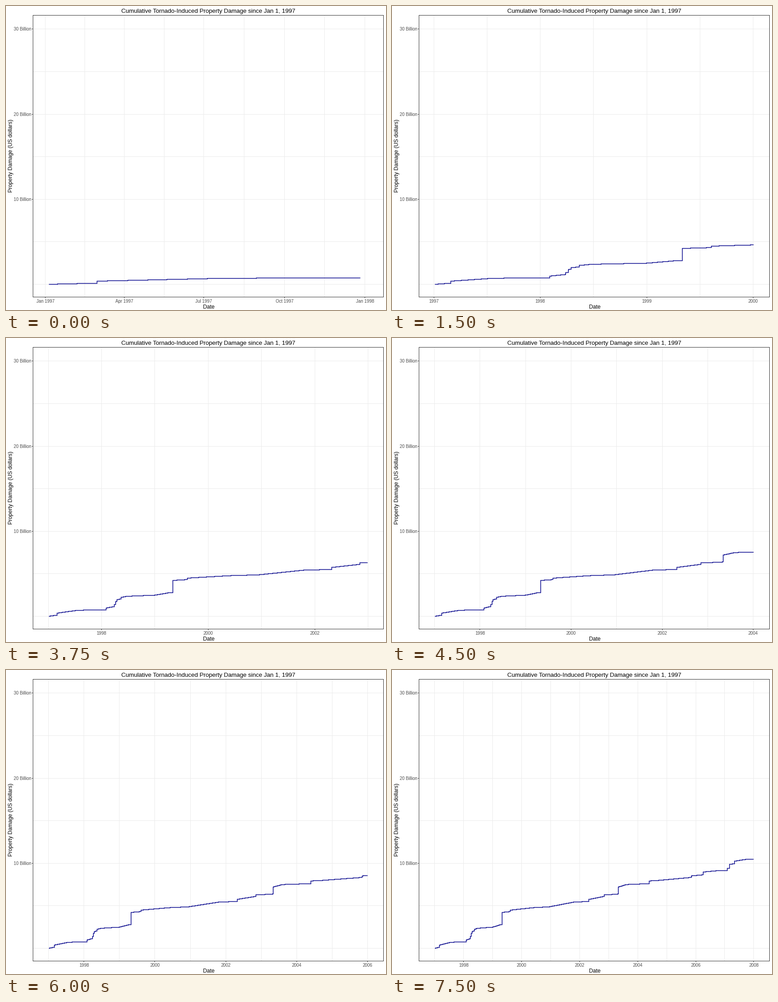
A matplotlib script for the animation above (8 s loop, 837x669 px).

```python
import numpy as np
import matplotlib.pyplot as plt
from matplotlib.animation import FuncAnimation
from matplotlib.patches import Rectangle

W, H, DPI = 837, 669, 72
LEFT, RIGHT, TOP, BOTTOM = 59.5, 831.5, 20.5, 640.5
PAD = (RIGHT - LEFT) / 22         # 5% of the data width on each side
DATA_X, DATA_W = LEFT + PAD, RIGHT - LEFT - 2 * PAD
ZERO_Y, PX_PER_BILLION = 612.4, 18.72
FIRST_DAY = 4                     # days since Jan 1, 1997
GRID, EDGE, TICK_TEXT, NAVY = "#ebebeb", "#333333", "#4d4d4d", "#00008b"

# Slow growth between outbreaks: (day, billions)
GROWTH = [(4, 0), (205, .47), (390, .50), (540, 1.0), (731, 1.13),
          (828, 1.42), (1240, 1.83), (1440, 1.93), (1750, 2.48),
          (1942, 2.57), (2118, 2.9), (2302, 2.99), (2410, 3.32),
          (2785, 3.46), (3576, 4.13), (3711, 4.13), (3938, 4.47)]
# Single outbreaks: (day, billions added)
OUTBREAKS = [(59, .24), (397, .20), (452, .23), (462, .32), (470, .19),
             (499, .17), (852, 1.42), (952, .17), (1943, .23), (2136, .20),
             (2315, .80), (2702, .32), (3231, .18), (3380, .33),
             (3684, .24), (3711, .48), (3775, .29)]
LAST_STORM = {0: 360, 3: 1445}    # seasons that ended early

plt.rcParams["font.family"] = "Liberation Sans"
fig = plt.figure(figsize=(W / DPI, H / DPI), dpi=DPI, facecolor="white")
ax = fig.add_axes([0, 0, 1, 1])
ax.set_xlim(0, W)
ax.set_ylim(H, 0)
ax.axis("off")


def stroke(x, y, color, width, z, smooth=False):
    line, = ax.plot(x, y, color=color, lw=width, antialiased=smooth, zorder=z,
                    solid_capstyle="butt", solid_joinstyle="miter")
    line.set_snap(False)
    return line


def label(x, y, text, size, color="black", ha="center", **kw):
    return ax.text(x, y, text, size=size, color=color, ha=ha,
                   **{"va": "baseline", **kw})


def pixel(v):
    return np.floor(v) + 0.5


def segments(xs, y0, y1):
    """Vertical strokes at each x, separated by gaps."""
    x = np.repeat(pixel(xs), 3)
    y = np.tile([y0, y1, np.nan], len(xs))
    return x, y


def new_year(year):
    n = year - 1997
    return 365 * n + n // 4


def money_y(billions):
    return ZERO_Y - PX_PER_BILLION * billions


def damage(days):
    total = np.interp(days, *zip(*GROWTH))
    for day, cost in OUTBREAKS:
        total += cost * (days >= day)
    return total


def date_axis(k):
    """Label days, label texts and grid days once k + 1 years are shown."""
    last = 1998 + k
    if k == 0:
        days = [0, 90, 181, 273, 365]
        texts = [m + " 1997" for m in ("Jan", "Apr", "Jul", "Oct")]
        texts.append("Jan 1998")
    elif k == 1:
        days = [0, 181, 365, 546, 730]
        texts = ["1997-01", "1997-07", "1998-01", "1998-07", "1999-01"]
    else:
        years = range(1997, last + 1) if k < 4 else range(1998, last + 1, 2)
        days = [new_year(y) for y in years]
        texts = [str(y) for y in years]
    if k < 4:
        grid = days + [(a + b) / 2 for a, b in zip(days, days[1:])]
    else:
        grid = [new_year(y) for y in range(1997, last + 1)]
    return days, texts, grid


for b in range(0, 31, 5):
    y = pixel(money_y(b))
    stroke([LEFT, RIGHT], [y, y], GRID, 1, 1)
    if b and b % 10 == 0:
        stroke([57, 59], [y, y], EDGE, 1, 4)
        label(56, y + 3.5, f"{b} Billion", 9.6, TICK_TEXT, "right")

ax.add_patch(Rectangle((LEFT, TOP), RIGHT - LEFT, BOTTOM - TOP, fill=False,
                       ec=EDGE, lw=1, antialiased=False, snap=False, zorder=5))
label(446, 15, "Cumulative Tornado-Induced Property Damage since Jan 1, 1997",
      13.2)
label(446.5, 666, "Date", 12)
label(17, 330, "Property Damage (US dollars)", 12, ha="right", va="center",
      rotation=90)

grid_lines = stroke([], [], GRID, 1, 1)
x_ticks = stroke([], [], EDGE, 1, 4)
curve = stroke([], [], NAVY, 1.5, 3, smooth=True)
curve.set_drawstyle("steps-post")
date_labels = [label(0, 653, "", 9.6, TICK_TEXT) for _ in range(6)]


def draw(i):
    k = i // 3
    # each view runs to the Sunday nearest New Year
    stop = FIRST_DAY + 7 * round((new_year(1998 + k) - FIRST_DAY) / 7)

    def day_x(days):
        return DATA_X + (np.asarray(days) - FIRST_DAY) * DATA_W / (
            stop - FIRST_DAY)

    days, texts, grid = date_axis(k)
    grid_lines.set_data(*segments(day_x(grid), TOP, BOTTOM))
    x_ticks.set_data(*segments(day_x(days), 641, 643))
    for item in date_labels:
        item.set_text("")
    for item, x, text in zip(date_labels, day_x(days), texts):
        item.set_text(text)
        item.set_x(x)

    past = np.arange(FIRST_DAY, LAST_STORM.get(k, stop) + 1)
    curve.set_data(pixel(day_x(past)), pixel(money_y(damage(past))))
    return [grid_lines, x_ticks, curve, *date_labels]


anim = FuncAnimation(fig, draw, frames=32, interval=250, repeat=True,
                     init_func=lambda: draw(0), blit=False)
plt.show()
```
